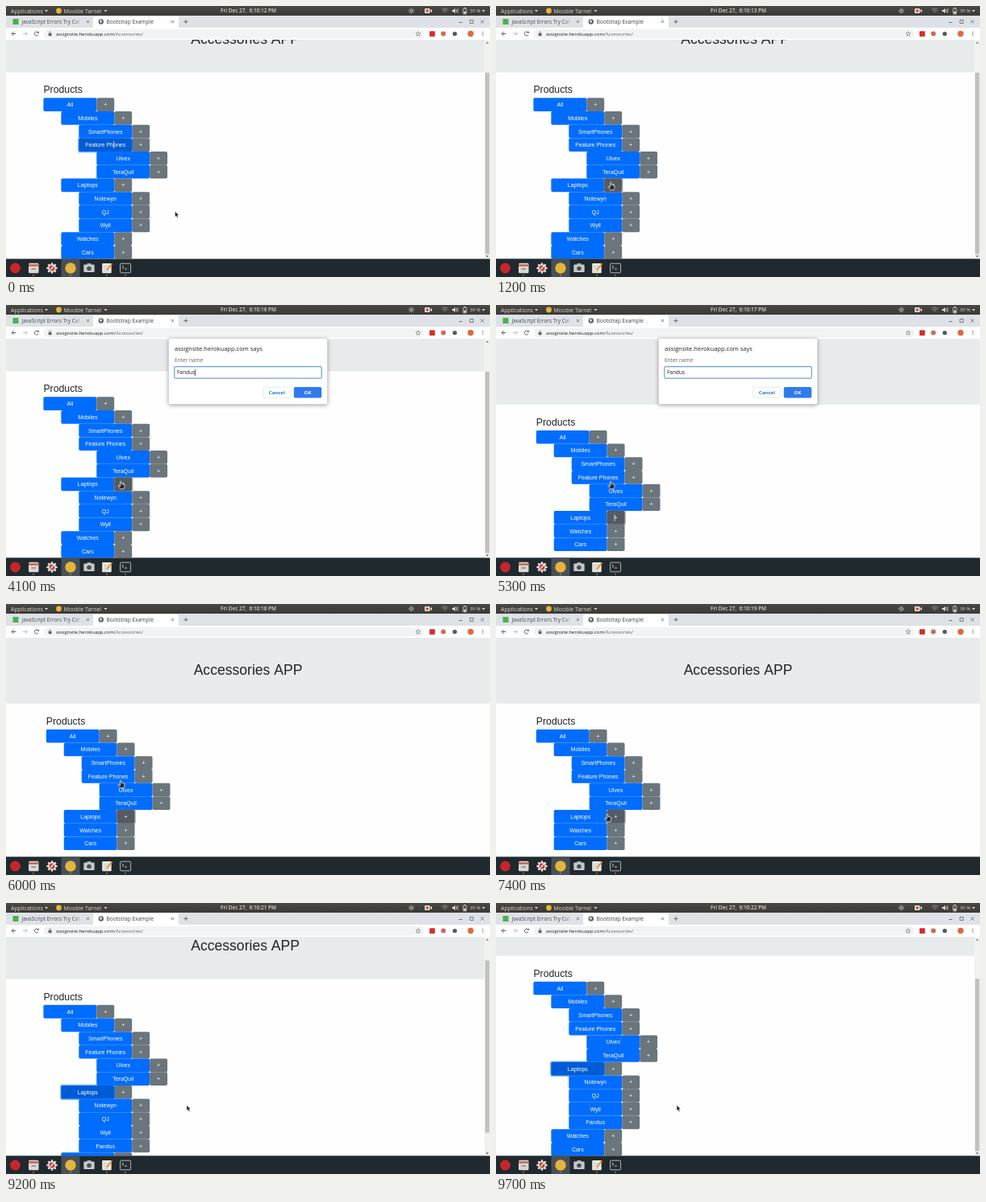
Recreate the animation shown at these times as an HTML page with a canvas. Size 600x337 px, loop 9.8 s.

```html
<!DOCTYPE html>
<html lang="en">
<head>
<meta charset="utf-8">
<title>Accessories APP</title>
<style>
html, body { margin: 0; width: 100%; height: 100%; overflow: hidden; background: #fff; }
canvas { display: block; width: 600px; height: 337px; }
</style>
</head>
<body>
<canvas id="stage"></canvas>
<script>
const W = 600, H = 337, LOOP = 9800, STEP = 100;
const TOP = 42, BOTTOM = 314.6, ROW = 16.69, INDENT = 21.96, BTN = 65.9, ADD = 21.9;
const UI = '"Open Sans", "Noto Sans", sans-serif';
const PAGE = '"Liberation Sans", Arial, sans-serif';
const NEW_NAME = 'Fandus';
const cv = document.getElementById('stage');
const ratio = Math.max(1, window.devicePixelRatio || 1);
cv.width = W * ratio;
cv.height = H * ratio;
const g = cv.getContext('2d');

// ---- drawing helpers ----
function rect(x, y, w, h, fill) {
  g.fillStyle = fill;
  g.fillRect(x, y, w, h);
}
function box(x, y, w, h, r, fill, stroke, lw = 1) {
  g.beginPath();
  g.roundRect(x, y, w, h, r);
  if (fill) { g.fillStyle = fill; g.fill(); }
  if (stroke) { g.strokeStyle = stroke; g.lineWidth = lw; g.stroke(); }
}
function disc(x, y, r, fill, stroke, lw = 1) {
  g.beginPath();
  g.arc(x, y, r, 0, Math.PI * 2);
  if (fill) { g.fillStyle = fill; g.fill(); }
  if (stroke) { g.strokeStyle = stroke; g.lineWidth = lw; g.stroke(); }
}
function poly(pts, fill, stroke, lw = 1, close = true) {
  g.beginPath();
  pts.forEach(([x, y]) => g.lineTo(x, y));
  if (close) g.closePath();
  if (fill) { g.fillStyle = fill; g.fill(); }
  if (stroke) { g.strokeStyle = stroke; g.lineWidth = lw; g.stroke(); }
}
const line = (x1, y1, x2, y2, color, lw = 1) => poly([[x1, y1], [x2, y2]], null, color, lw, false);
// Text whose capitals are centred on cy
function text(s, x, cy, size, color, font = UI, align = 'left', weight = 400) {
  g.font = `${weight} ${size}px ${font}`;
  g.textAlign = align;
  g.fillStyle = color;
  g.fillText(s, x, cy + size * 0.36);
}
function caretDown(x, y, color) {
  poly([[x - 2, y - 1], [x + 2, y - 1], [x, y + 1.5]], color);
}
function cross(x, y, r, color, lw) {
  line(x - r, y - r, x + r, y + r, color, lw);
  line(x - r, y + r, x + r, y - r, color, lw);
}

// ---- timeline ----
const T = { blur: 1100, open: 1800, submit: 5300, close: 5400, moved: 6300, pick: 8100, expand: 8500 };
const PATH = [
  [0, 209.5, 255.5], [100, 209.5, 255.5], [400, 145, 288], [900, 142.5, 219],
  [6200, 142.5, 219], [6700, 165, 213], [7000, 199, 231], [7200, 138.3, 261],
  [7400, 138.3, 261], [7800, 120, 267], [8100, 112, 266], [8400, 112, 266],
  [8700, 224, 251.5], [LOOP, 224, 251.5]
];
const KEYS = [3000, 3100, 3500, 3700, 3900, 4100];
const ease = p => p * p * (3 - 2 * p);
const clamp = p => Math.min(1, Math.max(0, p));

function pointer(t) {
  const i = Math.max(1, PATH.findIndex(p => p[0] >= t));
  const [t0, x0, y0] = PATH[i - 1], [t1, x1, y1] = PATH[i];
  const k = ease(clamp((t - t0) / (t1 - t0)));
  return { x: x0 + (x1 - x0) * k, y: y0 + (y1 - y0) * k };
}
function caretOn(t) {
  if (t < 2700) return t >= 2200 || t < 2100;
  if (t < 3000) return false;
  return t < 4500 || (t >= 5100 && t < T.submit);
}
function items(t) {
  const list = [['All', 0], ['Mobiles', 1], ['SmartPhones', 2], ['Feature Phones', 2],
    ['Ulvex', 3], ['TeraQuil', 3], ['Laptops', 1]];
  if (t < T.submit || t >= T.expand) list.push(['Notewyn', 2], ['QJ', 2], ['Wyll', 2]);
  if (t >= T.expand) list.push([NEW_NAME, 2]);
  list.push(['Watches', 1], ['Cars', 1]);
  return list;
}
function focusAt(t) {
  if (t < T.blur) return 'Feature Phones';
  return t < T.pick ? 'Laptops+' : 'Laptops';
}

// ---- page ----
function layout(t) {
  const list = items(t);
  const max = Math.max(0, 155.9 + ROW * list.length - BOTTOM);
  const long = max > 0;
  let scroll = 0;
  if (t < T.submit) scroll = max;
  else if (t >= T.expand) scroll = max * ease(clamp((t - 9000) / 400));
  const left = long ? 46.4 : 49.8;
  const buttons = [];
  list.forEach(([name, depth], i) => {
    const x = left + depth * INDENT, y = 155.9 + i * ROW - scroll;
    buttons.push({ id: name, label: name, x, y, w: BTN, blue: true });
    buttons.push({ id: name + '+', label: '+', x: x + BTN, y, w: ADD, blue: false });
  });
  return { buttons, max, scroll, left, long };
}
function hit(b, p) {
  return p.x >= b.x && p.x < b.x + b.w && p.y >= b.y && p.y < b.y + ROW;
}
function button(b, focused, hovered) {
  if (focused) {
    box(b.x - 1.3, b.y - 1.3, b.w + 2.6, ROW + 2.6, 2.6,
      b.blue ? 'rgba(0,123,255,.5)' : 'rgba(108,117,125,.5)');
  }
  let fill = b.blue ? '#006dff' : '#6a757c';
  if (hovered) fill = b.blue ? '#0060dd' : '#5a6268';
  if (focused) fill = b.blue ? '#005bd6' : '#545b62';
  box(b.x, b.y, b.w, ROW, 1.8, fill);
  text(b.label, b.x + b.w / 2, b.y + ROW / 2, 7.03, '#fff', PAGE, 'center');
}
function scrollbar(l) {
  const view = BOTTOM - TOP, track = 260;
  const size = track * view / (view + l.max);
  rect(593.2, TOP, 6.8, view, '#f1f1f1');
  rect(594, 48.5 + (track - size) * l.scroll / l.max, 5.2, size, '#c1c1c1');
  poly([[594.8, 46.5], [598.4, 46.5], [596.6, 44.4]], '#777');
  poly([[594.8, 310.5], [598.4, 310.5], [596.6, 312.6]], '#555');
}
function page(t, l, p) {
  g.save();
  g.beginPath();
  g.rect(0, TOP, W, BOTTOM - TOP);
  g.clip();
  rect(0, TOP, W, BOTTOM - TOP, '#fefefe');
  const width = l.long ? 593.2 : W;
  box(0, TOP - l.scroll, width, 82, 2.6, '#e8ebec');
  text('Accessories APP', width / 2, 82 - l.scroll, 17.57, '#212529', PAGE, 'center');
  text('Products', l.left, 145.5 - l.scroll, 12.3, '#212529', PAGE);
  const live = t < T.open || t >= T.moved;
  const focus = focusAt(t);
  l.buttons.forEach(b => { if (b.id !== focus) button(b, false, live && hit(b, p)); });
  button(l.buttons.find(b => b.id === focus), true, false);
  if (t < 100) line(133.7, 168, 133.7, 177, '#dfe9ff', 0.8);
  if (t >= T.submit && t < 6000) line(147, 260.5, 147, 269, '#e8e8e8', 0.8);
  if (l.long) scrollbar(l);
  g.restore();
}

// ---- prompt ----
function dialog(t) {
  g.save();
  g.shadowColor = 'rgba(0,0,0,.4)';
  g.shadowBlur = 5 * ratio;
  g.shadowOffsetY = ratio;
  box(201.5, 41.5, 197, 82, 2, '#fff');
  g.restore();
  box(201.5, 41.5, 197, 82, 2, null, '#c4c6c8', 0.5);
  text('assignsite.herokuapp.com says', 209, 54.5, 7.52, '#202124');
  text('Enter name', 209, 68.3, 6.5, '#5f6368');
  box(208.8, 76.7, 182.4, 14.4, 1.2, '#fff', '#4c86dc', 1);
  const typed = NEW_NAME.slice(0, KEYS.filter(k => k <= t).length);
  text(typed, 212, 84, 6.5, '#202124');
  const end = 212.4 + g.measureText(typed).width;
  if (caretOn(t)) line(end, 80, end, 88, '#111', 0.7);
  box(318.7, 102.2, 34.2, 13.2, 1.8, '#fff', '#dadce0', 0.6);
  text('Cancel', 335.8, 108.8, 6, '#1a73e8', UI, 'center', 700);
  box(356.8, 102, 34.4, 13.6, 1.8, '#2f7bee');
  text('OK', 374, 108.8, 6, '#fff', UI, 'center', 700);
}

// ---- desktop and browser frame ----
function topBar(t) {
  const grad = g.createLinearGradient(0, 0, 0, 12);
  grad.addColorStop(0, '#4a4843');
  grad.addColorStop(1, '#3b3a36');
  rect(0, 0, W, 12, grad);
  const ink = '#dfdbd2';
  text('Applications', 6, 6, 7, ink);
  caretDown(50, 6, ink);
  disc(65.5, 6, 3.4, '#e4b53c');
  text('Mooble Tarnel', 71.5, 6, 7, ink);
  caretDown(123.5, 6, ink);
  const sec = 12 + Math.floor((t + 300) / 1000);
  text(`Fri Dec 27,  6:10:${sec} PM`, 266, 6, 6.46, ink, UI, 'left', 600);
  disc(502.5, 6, 1.7, null, ink, 0.9);
  for (let i = 0; i < 8; i++) {
    const c = Math.cos(i * Math.PI / 4), s = Math.sin(i * Math.PI / 4);
    line(502.5 + c * 2.4, 6 + s * 2.4, 502.5 + c * 3.4, 6 + s * 3.4, ink, 0.8);
  }
  box(519, 3, 6.5, 6, 1, '#e9e3dc');
  poly([[525.5, 6], [528, 3.7], [528, 8.3]], ink);
  disc(522.2, 6, 1.7, '#d93a2f');
  for (let r = 2; r <= 6; r += 2) {
    g.beginPath();
    g.arc(544, 9, r, -Math.PI * 0.75, -Math.PI * 0.25);
    g.strokeStyle = '#9d9a92';
    g.lineWidth = 0.8;
    g.stroke();
  }
  poly([[553, 5], [554.5, 5], [557, 3], [557, 9], [554.5, 7], [553, 7]], ink);
  line(558.5, 4, 558.5, 8, ink, 0.7);
  line(560, 3, 560, 9, ink, 0.7);
  box(566.8, 3, 4, 7, 0.6, null, ink, 0.8);
  rect(568, 2, 1.6, 1, ink);
  rect(567.6, 6.7, 2.4, 2.8, ink);
  text('39 %', 575, 6, 5.8, ink);
  caretDown(592, 6, ink);
}
function frame() {
  rect(0, 12, W, 15, '#dee1e6');
  rect(0, 27, W, 15, '#fff');
  rect(8.5, 16, 7, 7, '#4caf50');
  g.save();
  g.beginPath();
  g.rect(18, 13, 76, 14);
  g.clip();
  text('JavaScript Errors Try Cat', 19.5, 19.5, 6.5, '#45494d');
  const fade = g.createLinearGradient(84, 0, 94, 0);
  fade.addColorStop(0, 'rgba(222,225,230,0)');
  fade.addColorStop(1, '#dee1e6');
  rect(84, 13, 10, 14, fade);
  g.restore();
  cross(101.5, 19.5, 1.6, '#5f6368', 0.8);
  box(108, 12.6, 106, 15, [3.5, 3.5, 0, 0], '#fff');
  disc(117.8, 19.5, 3.2, '#5f6368');
  poly([[115.8, 18], [118, 17.3], [119, 19.2], [117.5, 21.5]], '#dfe2e5');
  text('Bootstrap Example', 124.5, 19.5, 6.6, '#3c4043');
  cross(206.5, 19.5, 1.6, '#5f6368', 0.8);
  line(220.5, 19.5, 225.5, 19.5, '#5f6368', 0.9);
  line(223, 17, 223, 22, '#5f6368', 0.9);
  line(561.5, 20.5, 565.5, 20.5, '#5f6368', 0.9);
  box(575.2, 17.5, 4, 4, 0, null, '#5f6368', 0.8);
  cross(590.5, 19.5, 1.9, '#5f6368', 0.9);

  const arrow = (x, d, c) => {
    line(x - 2.6, 34.5, x + 2.6, 34.5, c, 0.9);
    poly([[x, 34.5 - 2.6], [x + d * 2.6, 34.5], [x, 34.5 + 2.6]], null, c, 0.9, false);
  };
  arrow(9.7, -1, '#4d5156');
  arrow(23.7, 1, '#b9bcc0');
  g.beginPath();
  g.arc(37.8, 34.5, 2.5, 0.5, 5.6);
  g.strokeStyle = '#4d5156';
  g.lineWidth = 0.9;
  g.stroke();
  poly([[38.3, 33.8], [40.8, 33.8], [40.8, 31.3]], '#4d5156');
  box(46.5, 28.8, 472, 11.6, 5.8, '#f1f3f4');
  box(52.7, 34, 3.8, 3.2, 0.4, '#5f6368');
  box(53.5, 32, 2.2, 3, 1, null, '#5f6368', 0.6);
  text('assignsite.herokuapp.com', 62, 34.5, 5.9, '#202124');
  const w = g.measureText('assignsite.herokuapp.com').width;
  text('/Accessories/', 62 + w, 34.5, 5.9, '#62666a');
  const star = [];
  for (let i = 0; i < 10; i++) {
    const a = i * Math.PI / 5 - Math.PI / 2, r = i % 2 ? 1.4 : 3;
    star.push([511 + Math.cos(a) * r, 34.7 + Math.sin(a) * r]);
  }
  poly(star, null, '#5f6368', 0.6);
  box(525, 31.2, 6.8, 6.8, 1, '#d5302b');
  disc(542.2, 34.6, 3, '#cf6a5c');
  disc(556.3, 34.6, 2.7, '#555a5e');
  line(566, 31, 566, 38, '#d6d9dc', 0.5);
  disc(576, 34.5, 3.7, '#e2683c');
  for (let y = 32.4; y < 37; y += 2.1) disc(591, y, 0.65, '#5f6368');
}
function taskbar() {
  rect(0, BOTTOM, W, H - BOTTOM, '#20292d');
  rect(68.5, BOTTOM, 23, H - BOTTOM, '#465056');
  disc(11.5, 326, 6.4, '#c5262b');
  box(28, 319.8, 12.5, 12.5, 1.5, '#d9d7d2');
  rect(28, 321.4, 12.5, 2.2, '#c9574a');
  rect(31.5, 326.2, 5.5, 1.6, '#8d8e8c');
  for (let i = 0; i < 4; i++) {
    const a = i * Math.PI / 4, c = Math.cos(a) * 6.6, s = Math.sin(a) * 6.6;
    line(57 - c, 326 - s, 57 + c, 326 + s, '#e4e2df', 2.3);
  }
  disc(57, 326, 5, '#e4e2df');
  disc(57, 326, 3.4, '#c93f35');
  line(55, 328, 60, 322.5, '#f1eeee', 1.3);
  disc(80, 326, 6.7, '#e4b53c');
  box(96.3, 321.5, 13.4, 9.6, 1.2, '#c3c7c7');
  rect(100.5, 320, 5, 2, '#aeb3b3');
  disc(103, 326.4, 3.5, '#4a5154', '#eceeee', 0.9);
  box(119.2, 320, 11.5, 12.2, 1, '#ece9df');
  for (let y = 323.5; y < 331; y += 2.2) line(121, y, 127.5, y, '#b9b6ac', 0.6);
  line(125, 328.5, 131.5, 320.5, '#e28a2b', 1.8);
  box(141.6, 320.2, 13, 11.6, 1, '#272d30', '#c2c6c6', 0.9);
  poly([[143.8, 323], [146, 324.8], [143.8, 326.6]], null, '#eee', 0.8, false);
  line(147, 327, 150, 327, '#eee', 0.8);
  [34, 80, 125, 148].forEach(x => disc(x, 334.8, 0.9, '#c98a52'));
}

// ---- mouse ----
function arrowCursor({ x, y }) {
  poly([[0, 0], [0, 6.8], [1.6, 5.4], [2.7, 8], [3.9, 7.5], [2.8, 5], [4.9, 4.8]]
    .map(([a, b]) => [x + a, y + b]), '#1b1b1b', '#f4f4f4', 0.5);
}
function handCursor({ x, y }) {
  poly([[-1, 0.6], [-0.3, 0], [0.5, 0.6], [0.6, 3.6], [2, 3.4], [3.2, 4], [4.4, 4.5], [4.5, 7.2],
    [3.6, 9.8], [-0.6, 9.8], [-3.4, 6.4], [-3.2, 5.2], [-1, 6.4]]
    .map(([a, b]) => [x + a, y + b]), '#2a2a2a', '#f0f0f0', 0.75);
}

function draw(t) {
  g.setTransform(ratio, 0, 0, ratio, 0, 0);
  const l = layout(t), p = pointer(t);
  page(t, l, p);
  frame();
  topBar(t);
  if (t >= T.open && t < T.close) dialog(t);
  taskbar();
  if (l.buttons.some(b => hit(b, p))) handCursor(p);
  else arrowCursor(p);
}
function tick() {
  const t = performance.now() % LOOP;
  draw(Math.floor(t / STEP) * STEP);
  requestAnimationFrame(tick);
}
tick();
</script>
</body>
</html>
```
